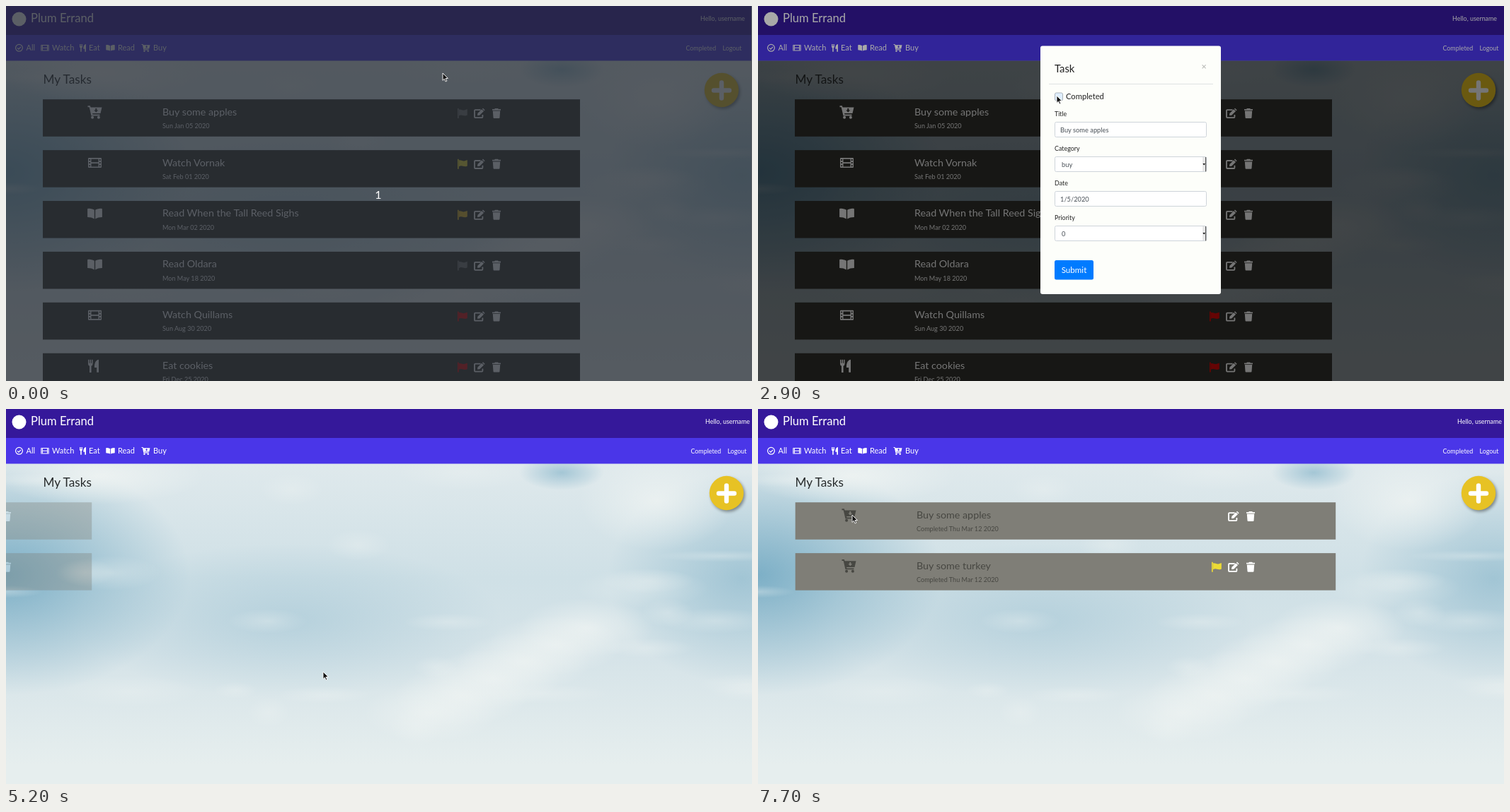
Write an HTML page that moves like this. It is 1054 px wide and 531 px high and loops after 8000 ms.

```html
<!DOCTYPE html>
<html lang="en">
<head>
<meta charset="utf-8">
<title>To-do list</title>
<style>
  html, body { margin: 0; width: 100%; height: 100%; overflow: hidden; }
  #stage { position: relative; width: 1054px; height: 531px; overflow: hidden; }
  #sky, svg { position: absolute; inset: 0; width: 1054px; height: 531px; }
  text { font-family: Lato, "Open Sans", sans-serif; white-space: pre; }
</style>
</head>
<body>
<div id="stage"><div id="sky"></div><svg id="scene" viewBox="0 0 1054 531"></svg></div>
<script>
const LOOP = 8000, STEP = 100;
const WHITE = '#fff', CARD = '#32322d', GREY = '#7f7e77', INK = '#474742';
const YELLOW = '#ecdb35', AMBER = '#e7bd25', RED = '#dc0808', DULL = '#777773';

// ---- sky: soft gradients and seeded wisps of cloud
let seed = 11;
const rnd = () => (seed = seed * 16807 % 2147483647) / 2147483647;
const blob = (rgb, a, x, y, rx, ry) =>
  `radial-gradient(${rx}px ${ry}px at ${x}px ${y}px, rgba(${rgb},${a}), rgba(${rgb},${a * .5}) 50%, rgba(${rgb},0))`;
const repeat = (n, draw) => Array.from({ length: n }, (_, i) => draw(i));
const cloud = '238,243,242', blue = '116,170,195';
const bank = repeat(6, i => blob(cloud, .75, 600 + 44 * i, 430 - 24 * i, 95, 42));
const wisps = repeat(24, () =>
  blob(cloud, .35, rnd() * 1054, 80 + rnd() * 400, 30 + rnd() * 70, 8 + rnd() * 20));
document.getElementById('sky').style.background = [
  ...bank, ...wisps,
  blob(cloud, .9, 130, 95, 150, 40),
  blob(cloud, .8, 920, 130, 110, 70),
  blob(blue, .55, 785, 90, 60, 25),
  blob(blue, .9, 0, 235, 260, 170),
  blob(blue, .3, 400, 300, 300, 110),
  blob(blue, .5, 1040, 240, 190, 150),
  'linear-gradient(#dfe9ec 15%, #cfe0e6 45%, #d5e3e8 65%, #e6eeee 95%)'
].join(',');

// ---- drawing helpers
const rect = (x, y, w, h, fill, more = '') =>
  `<rect x="${x}" y="${y}" width="${w}" height="${h}" fill="${fill}" ${more}/>`;
const text = (x, y, size, s, fill = WHITE, more = '') =>
  `<text x="${x}" y="${y}" font-size="${size}" fill="${fill}" ${more}>${s}</text>`;
const holes = [-8.2, 6.4].map(x => [-5.2, -1, 3.2].map(y => `M${x} ${y}h1.8v2h-1.8z`).join('')).join('');
const shapes = {
  cart: '<path d="M-10 -9h3.4l.6 2.2h16l-2 8.6h-11.4l.4 1.6h10v1.8h-12l-2.8-12.2h-2.2zM.8-5.2h2v2.4h2l-3 3-3-3h2z"/><circle cx="-3.4" cy="7.6" r="2"/><circle cx="5.4" cy="7.6" r="2"/>',
  film: `<path d="M-9.5 -6q0-1 1-1h17q1 0 1 1v12q0 1-1 1h-17q-1 0-1-1zM-5-5.3h10v4.4h-10zM-5 .9h10v4.4h-10z${holes}"/>`,
  book: '<path d="M-.7 7.6C-3 5.6-7 5.2-10.4 5V-6.2q0-1 1-1C-6.4-7.2-3-6.6-.7-5.2zM.7 7.6C3 5.6 7 5.2 10.4 5V-6.2q0-1-1-1C6.4-7.2 3-6.6.7-5.2z"/>',
  fork: '<path d="M-7.5 -9h1.5v5h1v-5h1.6v5h1v-5h1.5v6q0 2.4-2 3v9.2h-2.6v-9.2q-2-.6-2-3zM7.5 -9v18h-2.8v-6.6h-3.2C1.2-3 2.8-8.4 7.5-9z"/>',
  flag: '<path d="M-7-7h1.7v14h-1.7zM-5.6-5C-3-6.6-.5-3.8 2.5-4.4L6.8-5.8V2.6C3 5 0 2-3 2.6L-5.6 3.6z"/>',
  edit: '<path d="M1.6-4.8H-6q-1 0-1 1V5.2q0 1 1 1H3.4q1 0 1-1V2" fill="none" stroke="currentColor" stroke-width="1.8"/><path d="M-3 3.2L-2.6 .2 3.2-5.6 6-2.8 .2 2.9zM3.9-6.3L5-7.2 7.6-4.6 6.7-3.5z"/>',
  trash: '<path d="M-6-6h3l1-1h4l1 1h3v1.8h-12zM-5.2-3.4h10.4l-.7 9.4q-.1 1-1 1h-7q-.9 0-1-1z"/>',
  tick: '<g fill="none" stroke="currentColor" stroke-width="2"><circle r="8.2"/><path d="M-4 .2L-1 3.2 4.2-2.5"/></g>'
};
const icon = (name, x, y, color = WHITE, k = 1) =>
  `<g transform="translate(${x} ${y}) scale(${k})" fill="${color}" color="${color}" fill-rule="evenodd">${shapes[name]}</g>`;

const rowY = i => 132.2 + 71.9 * i;
function card(i, [kind, title, date, flag], done, x = 52, w = 759, gap = 0) {
  const y = rowY(i), ink = done ? INK : WHITE;
  return rect(x, y, w, 52.6, done ? GREY : CARD)
    + icon(kind, (kind === 'fork' ? 123.5 : 125.5) + gap, y + 18, ink)
    + text(221 + gap, y + 22.4, 14.3, title, ink)
    + text(221 + gap, y + 40.6, 9.1, date, ink)
    + ['flag', 'edit', 'trash'].map((name, k) => name === 'flag' && !flag ? ''
      : icon(name, 645 + 24 * k + gap, y + 19.7, k ? WHITE : flag)).join('');
}

const tasks = [
  ['cart', 'Buy some apples', 'Sun Jan 05 2020', DULL],
  ['film', 'Watch Vornak', 'Sat Feb 01 2020', YELLOW],
  ['book', 'Read When the Tall Reed Sighs', 'Mon Mar 02 2020', AMBER],
  ['book', 'Read Oldara', 'Mon May 18 2020', DULL],
  ['film', 'Watch Quillams', 'Sun Aug 30 2020', RED],
  ['fork', 'Eat cookies', 'Fri Dec 25 2020', RED]
];
const doneDate = 'Completed Thu Mar 12 2020';
const finished = [['cart', 'Buy some apples', doneDate], ['cart', 'Buy some turkey', doneDate, YELLOW]];

// icon, label, icon centre, label start
const menu = [
  ['tick', 'All', 18.5, 28.5], ['film', 'Watch', 55, 65], ['fork', 'Eat', 108.5, 117],
  ['book', 'Read', 147.5, 158], ['cart', 'Buy', 197.5, 208]
];
const header = rect(0, 0, 1054, 41, '#35189a') + rect(0, 41, 1054, 36.5, '#4a36e8')
  + '<circle cx="18.5" cy="18.5" r="10" fill="#fff"/>'
  + text(35, 22.8, 16.6, 'Plum Errand')
  + menu.map(([k, s, x, tx]) => icon(k, x, 59.3, WHITE, .6) + text(tx, 63.2, 11, s)).join('')
  + `<g id="hello">${text(1044, 21, 8.9, 'Hello, username', WHITE, 'text-anchor="end"')}</g>`
  + `<g id="links">${text(960.5, 62.6, 8.9, 'Completed')}${text(1012.5, 62.6, 8.9, 'Logout')}</g>`;

const fields = [['Title', 'Buy some apples'], ['Category', 'buy', true], ['Date', '1/5/2020'], ['Priority', '0', true]];
function field([label, value, select], i) {
  const y = 164 + 49 * i;
  return text(419, y - 8, 8.9, label, '#222')
    + rect(419.5, y + .5, 214, 21, '#fff', 'rx="2" stroke="#ced4da"')
    + text(select ? 429 : 427, y + 14.5, 9.3, value, '#495057')
    + (select ? rect(628, y + 1, 4.5, 20, '#e8e8e8') + rect(632, y + 1, 1.2, 20.5, '#555')
      + `<path d="M628.4 ${y + 10}h3.6l-1.8 2.4z" fill="#111"/>` : '');
}

const modal = rect(399, 56.5, 255, 351.5, '#fdfefa', 'rx="3"')
  + text(419, 94.3, 14.8, 'Task', '#222')
  + '<path d="M627.6 83.4l5 5m0-5l-5 5" stroke="#bfc0bd" stroke-width="1.3"/>'
  + rect(411, 110, 232, 1, '#dfe2e3')
  + rect(419.5, 123, 11, 11, '#fff', 'id="box" rx="2" stroke="#adb5bd"')
  + '<path id="check" d="M422 128.3l2.2 2.2 4-4.4" fill="none" stroke="#fff" stroke-width="1.6"/>'
  + text(435, 132.4, 11.2, 'Completed', '#222')
  + fields.map(field).join('')
  + rect(418, 359, 57, 29.5, '#80bdff', 'id="ring" rx="3.5"')
  + rect(419, 360, 55, 27.5, '#007bff', 'id="button" rx="2.5"')
  + text(446.5, 378, 11.6, 'Submit', WHITE, 'text-anchor="middle"');

document.getElementById('scene').innerHTML =
  `<defs><filter id="soft" x="-30%" y="-30%" width="170%" height="170%"><feGaussianBlur stdDeviation="2"/></filter></defs>`
  + `<g id="skyDim">${rect(0, 77, 1054, 454, '#04101c')}</g>`
  + header + text(52.5, 109.8, 17.2, 'My Tasks', '#272b2c')
  + `<g id="list">${tasks.map((t, i) => `<g class="row">${card(i, t)}</g>`).join('')}</g>`
  + `<g id="moved">${card(0, finished[0], true)}</g>`
  + `<g id="done">${finished.map((t, i) => card(i, t, true, 52.7, 763.5, 3)).join('')}</g>`
  + `<g id="plus"><circle cx="1013" cy="121.5" r="24" fill="#000" opacity=".4" filter="url(#soft)"/>`
  + `<circle cx="1011" cy="119" r="24.2" fill="#e7c224"/>`
  + `<path d="M1000 119.5h22M1011 108.5v22" stroke="#fff" stroke-width="6.4" stroke-linecap="round"/></g>`
  + rect(1053, 0, 1, 531, '#f4f5f5', 'id="edge"')
  + `<g id="dim">${rect(0, 0, 1054, 77.5, '#000', 'opacity=".34"')}${rect(0, 77.5, 1054, 453.5, '#000', 'opacity=".54"')}</g>`
  + `<g id="modal">${modal}</g>`
  + `<g id="status">${rect(0, 518, 69, 13, '#c4c5c5')}${text(2, 528, 8.6, 'localhost:8080/#', '#444')}</g>`
  + `<g id="count">${rect(0, 0, 1054, 531, '#242a32', 'opacity=".75"')}${text(526, 273, 16, '1', WHITE, 'text-anchor="middle"')}</g>`
  + `<g id="arrow"><path d="M0 0v10.4l2.4-2.2 1.7 3.8 1.7-.8-1.7-3.7h3.3z" fill="#111" stroke="#fff" stroke-width=".9"/></g>`
  + `<g id="hand"><path d="M0 0q1.3-.6 1.7.6v3.6q3.4 0 5.1 1.2l-.5 4.4-1 1.8h-4.6l-3.2-4.7q.7-1.2 2 .2z" fill="#222" stroke="#fff" stroke-width=".9"/></g>`;

// ---- motion
const ramp = (t, from, to) => Math.min(1, Math.max(0, (t - from) / (to - from)));

// each leg of the pointer: start, end, and where it stops
const legs = [
  [300, 900, 668, 147], [1400, 1900, 455, 124], [2000, 2300, 411, 123], [2300, 2700, 422, 127],
  [3500, 4000, 448, 372], [5900, 6800, 316, 180], [6800, 7400, 190, 186], [7500, 7700, 133, 150]
];
const pointer = t => legs.reduce(([x, y], [from, to, tx, ty]) => {
  const p = Math.sin(ramp(t, from, to) * Math.PI / 2);
  return [x + (tx - x) * p, y + (ty - y) * p];
}, [617, 95]);

const $ = id => document.getElementById(id);
const show = (id, on) => $(id).style.display = on ? '' : 'none';
const move = (id, x, y = 0) => $(id).setAttribute('transform', `translate(${x} ${y})`);
const paint = (id, name, value) => $(id).setAttribute(name, value);
const rows = [...document.querySelectorAll('.row')];

function render(t) {
  const open = ramp(t, 1200, 1400) * (1 - ramp(t, 4600, 4800));
  const ended = t >= 5200, wide = open > 0 || ended;

  show('count', t < 400);
  show('status', t >= 1100 && t < 1600);
  show('edge', !wide);
  move('hello', ended ? 7 : 0);
  move('links', wide ? 7 : 0);
  move('plus', wide ? 7 : 0);

  $('dim').style.opacity = open;
  $('skyDim').style.opacity = open * .4;
  $('modal').style.opacity = open;
  show('modal', open > 0);
  move('modal', 0, -28 * (1 - open));

  const checked = t >= 3100;
  show('check', checked);
  paint('box', 'fill', checked ? '#4caf50' : t >= 2900 ? '#dfeeff' : '#fff');
  paint('box', 'stroke', checked ? '#4caf50' : '#adb5bd');
  show('ring', t >= 4400);
  paint('button', 'fill', t >= 3900 ? '#0062cc' : '#007bff');

  // open tasks shrink away to the left
  const gone = ramp(t, 4700, 5000) ** 1.9, dx = -1050 * gone;
  show('list', gone < 1);
  rows.forEach((row, i) => {
    const y = rowY(i) + 26.3;
    row.setAttribute('transform',
      `translate(${431.5 + dx} ${y}) scale(${1 - gone}) translate(-431.5 ${-y})`);
    row.style.opacity = 1 - gone;
  });
  rows[0].style.display = gone ? 'none' : '';
  show('moved', gone > 0 && gone < 1);
  move('moved', dx);
  $('moved').style.opacity = .9;

  // completed tasks slide in
  const left = (1 - ramp(t, 5200, 5700)) ** 2;
  show('done', ended);
  move('done', -695 * left);
  $('done').style.opacity = 1 - .65 * left;

  const [x, y] = pointer(t), hand = t >= 3800 && t < 4700;
  show('arrow', !hand);
  show('hand', hand);
  move(hand ? 'hand' : 'arrow', x, y);
}

let last = -1;
function tick(now) {
  const t = Math.floor(now % LOOP / STEP) * STEP;
  if (t !== last) render(last = t);
  requestAnimationFrame(tick);
}
render(0);
requestAnimationFrame(tick);
</script>
</body>
</html>
```
